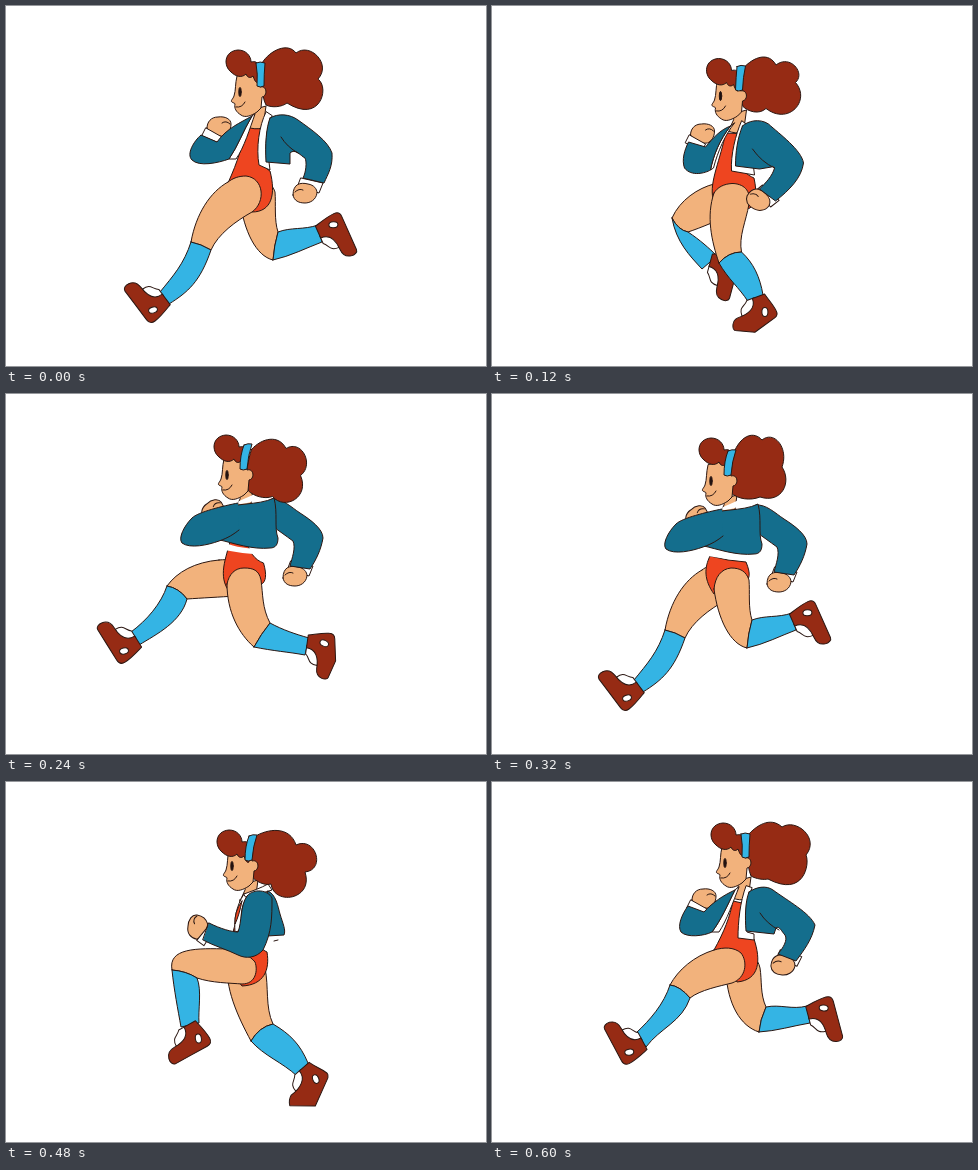
An HTML page that plays this animation: 480x360 px, repeating every 0.64 s.

```html
<!DOCTYPE html>
<html lang="en">
<head>
<meta charset="utf-8">
<title>Runner</title>
<style>
  html, body { margin: 0; width: 100%; height: 100%; overflow: hidden; background: #fff; }
  svg { display: block; width: 480px; height: 360px; }
  path, ellipse { stroke: #2b1712; stroke-width: 1; stroke-linejoin: round; stroke-linecap: round; }
  .plain path { stroke: none; }
</style>
</head>
<body>
<svg id="stage" viewBox="0 0 480 360"></svg>
<script>
const LOOP = 640, STEP = 40;
const SKIN = '#f2b27c', HAIR = '#962b14', BLUE = '#34b4e4', TEAL = '#146e8d', RED = '#ee4520', WHITE = '#fff';
const stage = document.getElementById('stage');
const NUM = /-?\d+(\.\d+)?/g;

// Blend two strings that share a structure, number by number.
function mix(a, b, k) {
  const to = b.match(NUM);
  let i = 0;
  return a.replace(NUM, n => ' ' + (+n + (to[i++] - n) * k).toFixed(2));
}

// Keys map a time to a string; the track wraps around the loop.
function at(keys, t) {
  const times = Object.keys(keys).map(Number);
  t = (t + LOOP) % LOOP;
  const j = times.findIndex(x => x > t);
  const last = times.length - 1;
  const a = j < 0 ? times[last] : j ? times[j - 1] : times[last] - LOOP;
  const b = j < 0 ? times[0] + LOOP : times[j];
  return mix(keys[(a + LOOP) % LOOP], keys[b % LOOP], (t - a) / (b - a));
}
const nums = s => s.match(NUM).map(Number);

function add(parent, tag, attrs) {
  const el = document.createElementNS('http://www.w3.org/2000/svg', tag);
  for (const k in attrs) el.setAttribute(k, attrs[k]);
  return parent.appendChild(el);
}
const group = (parent = stage, attrs = {}) => add(parent, 'g', attrs);
const shape = (parent, fill, d = '') => add(parent, 'path', { fill, d });
function place(el, x, y, r = 0) {
  el.setAttribute('transform', `translate(${x} ${y}) rotate(${r})`);
}
// A morphing path; returns its update function.
function morph(parent, fill, keys) {
  const el = shape(parent, fill);
  return t => el.setAttribute('d', at(keys, t));
}

// Tracks
const eyePos = { 0: '234 86', 80: '231 96', 160: '226 84', 240: '221 81', 320: '219 87', 400: '221 96', 480: '226 84', 560: '231 79', 600: '233 81' };
const bunPos = { 0: '232 56', 80: '230 69', 160: '223 60', 240: '220 53', 320: '219 56', 400: '220 69', 480: '223 60', 560: '229 52', 600: '231 53' };
const sway = { 0: '0', 160: '0', 240: '-9', 280: '-11', 320: '-12', 400: '-9', 480: '0' };

// One leg through a full stride; the other runs half a loop apart.
const thighKeys = {
  0: 'M222 176C204 186 190 208 185 236Q195 238 205 244C212 228 230 215 246 206C260 196 258 172 240 170C233 170 227 172 222 176Z',
  80: 'M222 194C210 215 207 235 209 255Q220 247 232 250C234 236 245 226 255 210C262 192 252 181 240 181C232 182 226 186 222 194Z',
  160: 'M222 180C218 205 232 235 245 259Q253 245 267 242C259 225 263 205 259 186C257 176 250 174 240 174C232 174 225 176 222 180Z',
  240: 'M230 190C230 218 242 240 257 253Q264 240 273 229C265 214 266 200 264 186C262 176 256 174 247 174C238 174 232 180 230 190Z',
  280: 'M234 192C236 222 248 244 267 250Q268 238 274 225C268 212 270 198 268 186C266 176 259 173 250 174C240 175 235 182 234 192Z',
  320: 'M234 195C238 225 250 250 267 254Q268 240 272 226C268 214 270 198 269 186C266 177 260 174 251 174C241 175 235 183 234 195Z',
  400: 'M224 200C212 220 205 238 205 254Q207 266 222 264C226 246 244 236 258 214C270 192 258 182 248 183C236 184 228 190 224 200Z',
  440: 'M222 178C206 182 188 194 180 212Q186 224 196 226C208 222 228 214 240 207C256 200 256 186 250 180C242 173 232 174 222 178Z',
  480: 'M222 167C190 166 162 166 166 188Q180 189 191 196C206 201 224 201 236 202C250 202 252 188 249 180C244 174 234 168 222 167Z',
  560: 'M222 166C198 168 180 178 170 192Q182 194 190 205C204 204 224 203 238 202C253 198 254 182 248 174C242 166 232 165 222 166Z',
  600: 'M222 168C202 174 186 188 178 203Q188 204 198 216C208 208 228 204 240 201C254 196 256 180 249 171C242 165 232 165 222 168Z'
};
const sockKeys = {
  0: 'M185 236C178 258 167 270 154 286L163 298C182 286 194 276 205 244Q195 238 185 236Z',
  80: 'M209 255C214 272 219 284 221 297L240 297C242 280 239 262 232 250Q220 247 209 255Z',
  160: 'M245 259C258 274 276 280 291 294L302 281C294 262 284 252 267 242Q253 245 245 259Z',
  240: 'M257 253C276 257 292 258 308 261L312 244C298 240 286 236 273 229Q264 240 257 253Z',
  280: 'M267 250C285 249 300 244 318 241L315 224C300 228 288 222 274 225Q268 238 267 250Z',
  320: 'M267 254C285 250 300 242 316 236L312 219C298 224 285 221 272 226Q268 240 267 254Z',
  400: 'M222 264C244 262 256 257 266 251L259 236C250 234 238 235 229 243Q224 251 222 264Z',
  440: 'M180 212C184 236 198 250 210 263L225 250C217 242 208 234 196 226Q186 224 180 212Z',
  480: 'M166 188C168 208 172 228 175 245L193 241C192 228 196 208 191 196Q180 189 166 188Z',
  560: 'M170 192C164 210 150 226 134 238L142 251C160 240 184 228 190 205Q182 194 170 192Z',
  600: 'M178 203C172 222 158 238 144 251L154 265C168 246 190 240 198 216Q188 204 178 203Z'
};
// x, y, angle, bend
const shoeKeys = {
  0: '158 292 53 0', 80: '232 297 0 0', 160: '297 287 -41 1', 240: '311 250 -82 0.3', 280: '317 233 -105 0',
  320: '314 228 -114 0', 400: '262 246 -121 0', 440: '219 257 -75 0', 480: '182 244 -29 0', 560: '139 246 58 0', 600: '150 260 62 0'
};
const flatShoe = 'M-4 -1L9 -1C11 7 13 14 13 21C13 25 11 27 7 27L-12 27L-29 27C-35 27 -35 12 -22 12C-12 12 -4 9 -4 -1Z';
const bentShoe = 'M-4 -1L9 -1C11 7 14 12 15 17C16 20 15 21 13 23L-15 36L-34 19C-32 15 -29 13 -26 12C-14 13 -4 9 -4 -1Z';

function makeLeg(delay) {
  const g = group();
  const thigh = morph(g, SKIN, thighKeys), sock = morph(g, BLUE, sockKeys);
  const shoe = group(g);
  shape(shoe, WHITE, 'M-20 12C-20 2 -14 4 -10 -1L-2 -1C-2 6 -4 12 -10 13Z');
  const upper = shape(shoe, HAIR);
  add(shoe, 'ellipse', { cx: 3, cy: 16, rx: 3, ry: 4.5, fill: WHITE, transform: 'rotate(20 3 16)' });
  return t => {
    const phase = (t + delay) % LOOP;
    place(g, nums(at(sway, t))[0], 0);
    thigh(phase);
    sock(phase);
    const [x, y, r, bend] = nums(at(shoeKeys, phase));
    place(shoe, x, y, r);
    upper.setAttribute('d', mix(flatShoe, bentShoe, bend));
  };
}

function makeHand(parent, back, keys) {
  const g = group(parent);
  if (back) {
    shape(g, WHITE, 'M-4 -15L18 -10L14 0L-7 -7Z');
    shape(g, SKIN, 'M-12 2C-12 -9 -5 -11 3 -9C9 -8 12 -4 12 0C11 7 5 10 0 10C-6 10 -11 8 -12 2Z');
    shape(g, 'none', 'M-10 -1Q-6 -5 -2 -3');
  } else {
    shape(g, SKIN, 'M-12 3C-12 -3 -8 -8 -1 -8C6 -9 12 -6 12 -1C12 5 9 9 5 11C-2 12 -9 8 -12 3Z');
    shape(g, 'none', 'M3 -2Q7 -5 11 -1');
    shape(g, WHITE, 'M-13 3L3 12L0 18L-17 11Z');
  }
  return t => place(g, ...nums(at(keys, t)));
}

// Layers, back to front
const farLeg = makeLeg(320);
const backArm = group();
const suit = morph(group(), RED, {
  0: 'M241 121L256 123C254 145 252 158 264 165C270 188 266 206 246 206L222 177C232 155 236 140 241 121Z',
  80: 'M233 136L246 135C243 155 244 166 263 174C268 194 266 208 256 212L221 195C222 180 228 155 233 136Z',
  160: 'M234 118L244 120C243 150 250 165 261 170C263 182 262 190 258 193L221 190C212 172 230 150 234 118Z',
  320: 'M218 162L236 166C242 167 248 167 254 168C259 180 258 186 252 188L222 200C212 186 212 174 218 162Z',
  400: 'M217 172L236 174C243 175 250 175 257 174C262 192 262 206 254 210L217 200C214 190 214 181 217 172Z',
  480: 'M234 118L244 120C243 150 250 165 261 170C264 188 258 203 236 204L225 190C216 172 230 150 234 118Z',
  600: 'M241 119L250 121C249 140 250 153 262 157C269 178 268 198 245 200L222 168C232 150 238 135 241 119Z'
});
const nearLeg = makeLeg(0);
const neck = group();
shape(neck, SKIN, 'M12 18L26 14L23 36Q14 38 8 35L13 24Z');

// Jacket seen open
const open = group();
const openParts = [
  morph(open, WHITE, {
    0: 'M249 108C244 122 238 142 230 153L223 153C232 140 237 125 246 110Z',
    80: 'M245 123C236 134 228 152 224 168L221 170C224 155 230 140 241 126Z',
    600: 'M247 105C241 120 235 138 227 150L220 150C229 138 235 124 243 108Z'
  }),
  makeHand(open, false, { 0: '213 119 0', 80: '213 132 0', 600: '212 115 0' }),
  morph(open, TEAL, {
    0: 'M246 110C234 117 221 122 211 136L195 129C188 135 180 148 186 154C193 161 212 157 223 153C232 140 237 125 246 110Z',
    80: 'M241 126C230 130 224 138 216 147L199 142C195 150 192 160 195 168C202 177 216 173 221 170C224 155 230 140 241 126Z',
    600: 'M243 108C232 113 221 120 212 130L196 124C190 132 185 144 189 150C195 156 212 154 220 150C229 138 235 124 243 108Z'
  }),
  morph(open, WHITE, {
    0: 'M260 106C253 120 250 142 253 159L264 164L263 156L261 154C259 140 260 122 266 110Z',
    80: 'M252 121C246 135 241 155 242 171L265 175L264 167L248 165C247 150 250 135 256 124Z',
    600: 'M254 104C248 120 246 140 246 156L262 158L262 152L255 150C253 138 254 120 260 106Z'
  }),
  makeHand(open, true, { 0: '299 187 0', 80: '269 200 30', 600: '291 183 5' }),
  morph(open, TEAL, {
    0: 'M264 112C272 107 284 108 292 114C306 124 322 135 326 147C327 160 322 168 318 177L297 172C300 166 301 156 299 152C295 150 289 142 284 147L284 158L260 156C259 140 260 122 264 112Z',
    80: 'M253 126C258 121 270 118 279 124C290 134 312 150 314 163C312 178 300 190 286 201L270 189C276 183 283 176 285 168C284 166 283 166 282 167L270 169L246 166C246 152 248 138 253 126Z',
    600: 'M257 110C264 105 274 103 281 108C296 119 318 131 323 143C320 158 312 168 304 179L286 172C291 166 296 158 293 153C290 150 287 143 284 146L282 152L254 149C253 135 253 120 257 110Z'
  }),
  morph(open, 'none', {
    0: 'M275 131Q281 141 292 147', 80: 'M263 149Q272 162 285 168', 600: 'M268 131Q275 142 287 148'
  })
];

// Jacket seen from the side, arm passing the body
const side = group();
shape(side, WHITE, 'M238 112C230 124 228 138 229 150L236 148C234 130 236 122 242 114Z');
shape(side, RED, 'M236 119Q228 130 229 142Q233 134 236 119Z');
shape(side, WHITE, 'M238 112C246 109 255 106 262 102L266 108Q252 113 240 115Z');
shape(side, TEAL, 'M262 109C270 112 272 125 274 132C277 142 280 148 278 153L261 154Z');
shape(side, 'none', 'M268 159L272 158');
makeHand(side, false, { 0: '190 145 -80' })(0);
shape(side, TEAL, 'M203 141C215 147 226 150 232 150C236 140 234 124 241 114C248 106 262 108 266 116C266 135 266 150 257 168C250 176 240 177 232 173C222 168 208 164 197 158Z');

// Jacket seen closed, chest turned away
const closed = group();
const trim = group(closed, { class: 'plain' });
const closedParts = [
  makeHand(backArm, true, { 320: '287 188 0', 400: '264 203 30' }),
  morph(backArm, TEAL, {
    320: 'M264 111C274 110 283 119 292 125C303 132 315 141 315 150C313 162 308 172 302 181L282 178C284 170 288 160 285 153C278 148 270 142 264 138Z',
    400: 'M266 121C278 124 286 136 294 144C302 152 306 160 306 166C300 182 288 194 280 204L264 190C270 184 276 176 275 168C273 162 268 154 267 150Z'
  }),
  morph(trim, WHITE, {
    320: 'M228 115C236 110 244 108 250 104L256 108Q244 115 232 116Z',
    400: 'M232 126C238 122 246 116 254 112L258 118Q248 124 236 126Z'
  }),
  morph(trim, WHITE, {
    320: 'M212 152C225 160 245 162 266 160L256 167Q236 166 216 162Z',
    400: 'M215 165C230 168 250 169 270 168L268 174Q244 174 216 171Z'
  }),
  morph(closed, TEAL, {
    320: 'M214 122C225 114 250 118 266 110C270 125 266 140 270 150C270 156 268 160 262 160C245 162 225 155 212 152Z',
    400: 'M214 134C226 126 250 124 266 121C272 135 268 150 272 160C274 166 272 168 266 168C248 170 228 166 215 165Z'
  }),
  makeHand(closed, false, { 320: '204 122 -35', 400: '209 133 -30' }),
  morph(closed, TEAL, {
    320: 'M230 115C215 118 190 124 184 130C176 138 170 150 174 155C182 161 200 157 211 153C220 150 226 146 231 142',
    400: 'M228 128C214 130 200 138 192 144C186 152 185 166 188 171C194 177 206 172 214 168C224 163 234 158 241 152'
  })
];

const sideHair = 'M248 55C262 46 284 44 290 63C310 54 320 88 299 90C308 118 268 124 265 102C258 104 250 99 246 95C243 82 245 66 248 55Z';
const hair = morph(group(), HAIR, {
  0: 'M256 57C264 44 282 36 290 47C304 36 326 58 312 73C324 82 314 118 281 97C276 101 266 102 260 99C255 90 256 70 256 57Z',
  80: 'M254 70C262 54 270 48 278 55C286 42 308 46 308 63C330 70 326 116 283 103C276 114 262 112 256 106C252 96 253 82 254 70Z',
  160: sideHair,
  320: 'M243 56C250 41 262 37 270 46C282 36 297 54 290 73C300 88 290 110 268 103C258 107 246 105 239 99C234 90 238 68 243 56Z',
  400: 'M244 68C250 50 262 44 271 54C282 44 298 56 294 74C312 80 308 116 268 110C258 108 248 108 242 102C237 90 241 78 244 68Z',
  480: sideHair,
  600: 'M256 53C264 44 278 34 290 45C304 36 328 56 314 73C318 82 312 116 276 97C272 98 264 97 259 94C254 82 256 66 256 53Z'
});

const face = group();
shape(face, SKIN, 'M-3 -16C-5 -8 -4 -2 -6 4C-7 7 -10 9 -8 10C-7 11 -5 11 -5 12C-6 16 -4 20 1 23C5 26 11 24 17 20L21 16L22 5C28 4 27 -7 20 -5L16 -20Z');
add(face, 'ellipse', { cx: 0, cy: 0, rx: 1.2, ry: 4.6, fill: '#1c1010' });
shape(face, 'none', 'M-4 15Q2 16 5 10');
const bun = group();
shape(bun, HAIR, 'M-7 10C-15 4 -14 -11 0 -12C8 -12 13 -6 13 0C17 -1 20 0 20 4L20 20C18 22 16 17 15 14C12 17 9 15 8 12C4 16 -2 15 -7 10Z');
const bandGroup = group();
const OPEN_BAND = 'M16 -29Q20 -31 25 -29Q24 -18 24 -6Q20 -4 17 -6Q18 -18 16 -29Z';
const LEAN_BAND = 'M17 -30Q21 -32 25 -31Q21 -20 20 -6Q16 -4 13 -6Q13 -20 17 -30Z';
const band = morph(bandGroup, BLUE, { 0: OPEN_BAND, 80: OPEN_BAND, 160: LEAN_BAND, 480: LEAN_BAND, 560: OPEN_BAND });

// Show a jacket view; outside its own keys it rides with the head.
function view(groups, parts, visible, t, keyTime) {
  const [x, y] = nums(at(eyePos, t)), [kx, ky] = nums(at(eyePos, keyTime));
  for (const g of groups) {
    g.style.display = visible ? '' : 'none';
    place(g, x - kx, y - ky);
  }
  if (visible) parts.forEach(p => p(keyTime));
}

function draw(now) {
  const t = Math.floor(now % LOOP / STEP) * STEP;
  for (const update of [farLeg, nearLeg, suit, hair, band]) update(t);
  const eye = nums(at(eyePos, t));
  for (const g of [neck, face, bandGroup]) place(g, ...eye);
  place(bun, ...nums(at(bunPos, t)));

  const isOpen = t < 160 || t >= 560, isClosed = t >= 240 && t < 480;
  view([open], openParts, isOpen, t, t < 320 ? Math.min(t, 80) : Math.max(t, 600));
  view([closed, backArm], closedParts, isClosed, t, Math.min(Math.max(t, 320), 400));
  view([side], [], !isOpen && !isClosed, t, 160);
  requestAnimationFrame(draw);
}
draw(performance.now());
</script>
</body>
</html>
```
